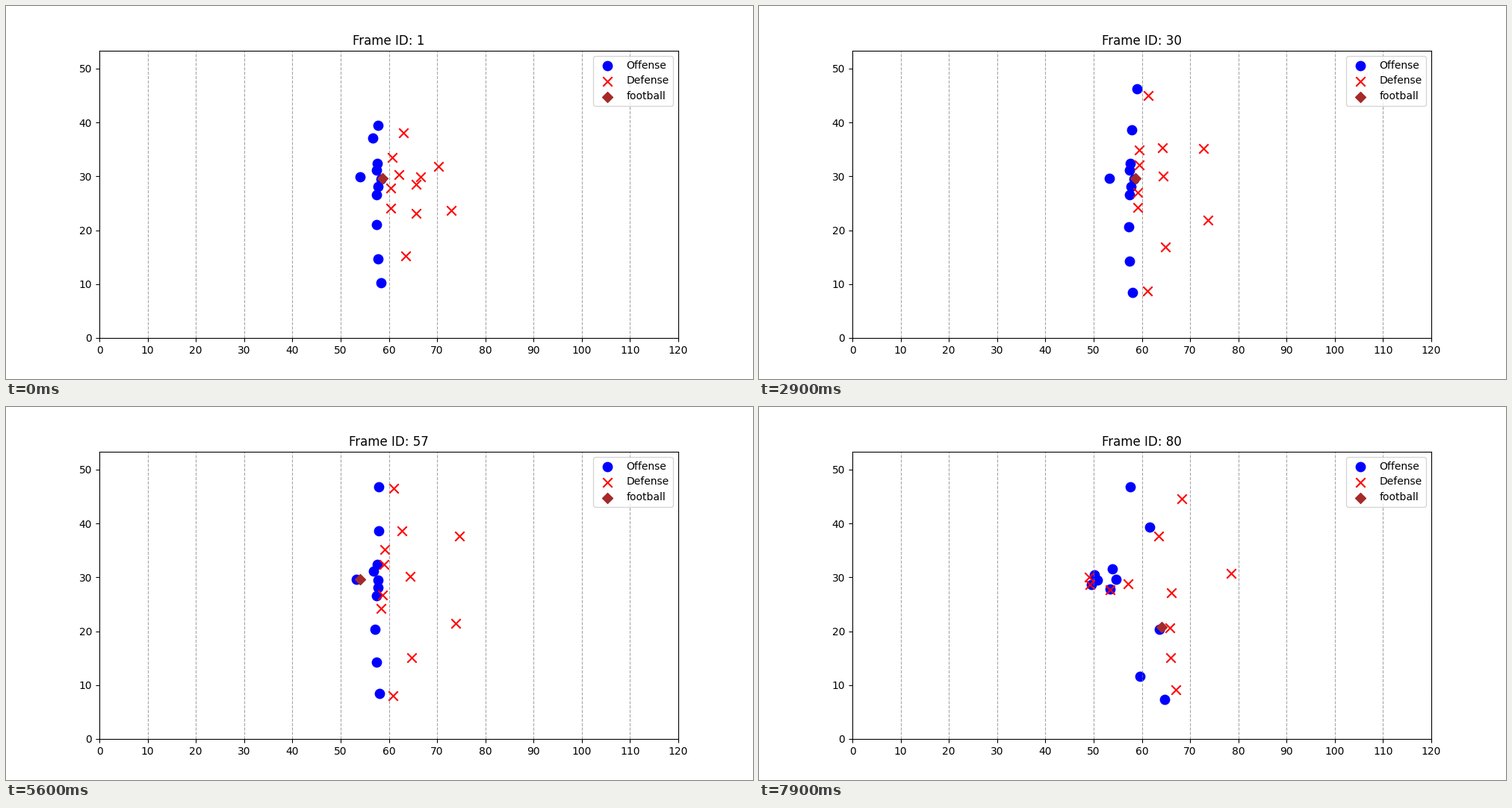
A matplotlib script that plays this animation: 1000 px wide and 500 px high, repeating every 8000 ms.

```python
import numpy as np
import matplotlib.pyplot as plt
from matplotlib.animation import FuncAnimation

FRAMES, INTERVAL = 80, 100
LENGTH, WIDTH = 120, 53.3
SNAP, BREAK, THROW, CATCH = 50.7, 56, 72, 79
clock = np.arange(FRAMES)


def ramp(start, end):
    """0 before start, 1 after end, as a column over all frames."""
    return np.clip((clock - start) / (end - start), 0, 1)[:, None]


def ease_out(u, power):
    return 1 - (1 - u) ** power


def blend(a, b, u):
    a, b = np.asarray(a, float), np.asarray(b, float)
    return a + (b - a) * u


def run(start, ready, finish, pace, burst=0.9, sway=0):
    """Shift to the ready spot, then break: sideways at once, across later."""
    u = ramp(BREAK, CATCH)
    path = blend(start, ready, ease_out(ramp(0, BREAK), pace))
    path[:, :1] += sway * np.sin(np.pi * ramp(0, 36))
    return path + np.subtract(finish, ready) * np.hstack([u ** burst, u ** 2.4])


def block(stance, rusher, offset):
    """Hold the stance, then stay beside one rusher."""
    u = ramp(BREAK, 70)
    return blend(stance, rusher + offset, u * u * (3 - 2 * u))


def retreat(stance, finish):
    return blend(stance, finish, ramp(SNAP, CATCH) ** 1.1)


def to_yards(path):
    return (path - (125, 445)) * (LENGTH / 775, -WIDTH / 385)


# All spots are in stage pixels.
left_end = run((517, 203), (507, 191), (442, 228), 2.3)
right_end = run((515, 271), (502, 270), (443, 238), 1.2)
tackle = run((515, 244), (504, 252), (470, 245), 1.8)

defense = [
    left_end, right_end, tackle,
    run((526, 226), (506, 211), (494, 237), 2.6),
    run((532, 170), (519, 109), (566, 123), 2.3),
    run((555, 229), (530, 166), (535, 173), 1.3),
    run((579, 215), (607, 173), (632, 223), 1.2),
    run((549, 239), (541, 227), (552, 249), 4),
    run((549, 278), (543, 336), (551, 336), 2),
    run((596, 274), (602, 290), (550, 296), 2.5, burst=1.5),
    run((535, 335), (518, 387), (558, 379), 3.2),
]

passer = blend((474, 229), (469, 231), ease_out(ramp(0, BREAK), 6))
passer = blend(passer, (453, 232), ease_out(ramp(BREAK, 71), 2))
catcher = run((496, 293), (494, 298), (536, 298), 1.3, burst=1.7)

offense = [
    block((497, 211), left_end, (7, -3)),
    block((498, 242), tackle, (0, -1)),
    block((496, 253), right_end, (2, 0)),
    retreat((496, 220), (473, 217)),
    retreat((502, 232), (478, 231)),
    passer, catcher,
    run((498, 160), (499, 107), (497, 107), 3.5, sway=12),
    run((491, 177), (499, 166), (523, 161), 5, burst=1.3),
    run((498, 339), (496, 342), (510, 361), 3, burst=2.2),
    run((502, 371), (500, 384), (543, 392), 6, burst=1.8),
]

ball = blend((504, 231), passer + (-3, 0), ramp(SNAP, 57.4))
ball = blend(ball, catcher + (3, -3), ramp(THROW, CATCH))

offense, defense = (np.stack([to_yards(p) for p in team], axis=1) for team in (offense, defense))
ball = to_yards(ball)

fig, ax = plt.subplots(figsize=(10, 5), dpi=100)
ax.set_xlim(0, LENGTH)
ax.set_ylim(0, WIDTH)
ax.set_xticks(range(0, LENGTH + 1, 10))
ax.grid(axis="x", color="gray", linestyle="--", alpha=0.7)

blue = ax.scatter(*offense[0].T, s=80, c="blue", marker="o", label="Offense")
red = ax.scatter(*defense[0].T, s=80, c="red", marker="x", label="Defense")
brown = ax.scatter(*ball[0], s=50, c="brown", marker="D", label="football")
ax.legend(loc="upper right")
title = ax.set_title("Frame ID: 1")


def update(n):
    blue.set_offsets(offense[n])
    red.set_offsets(defense[n])
    brown.set_offsets(ball[n:n + 1])
    title.set_text(f"Frame ID: {n + 1}")
    return blue, red, brown, title


anim = FuncAnimation(fig, update, frames=FRAMES, interval=INTERVAL, repeat=True, repeat_delay=0)
plt.show()
```
